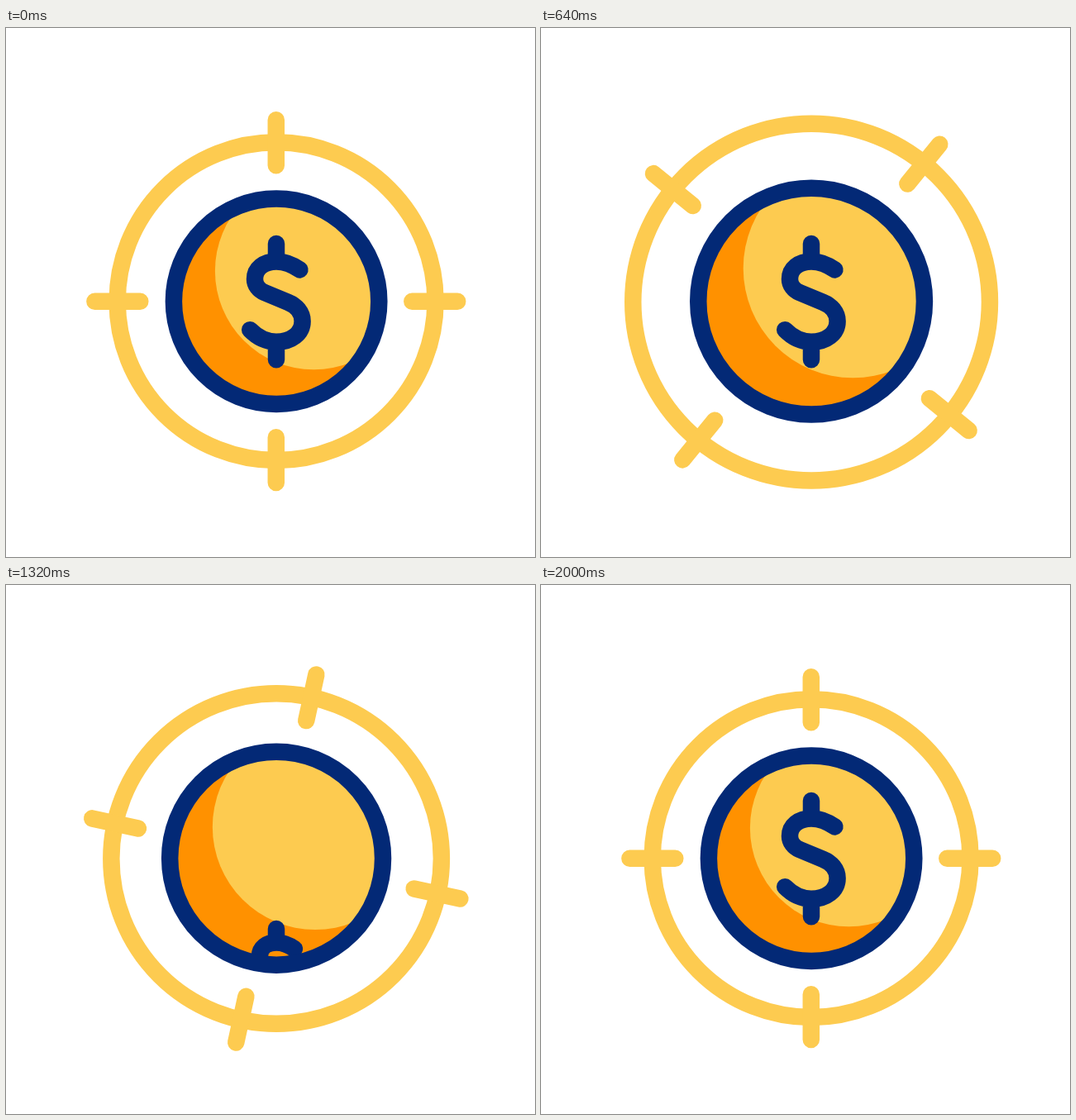
These frames come from a looping animation (640 by 640 pixels, 2220 ms). An HTML page with a canvas:

```html
<!DOCTYPE html>
<html lang="en">
<head>
<meta charset="utf-8">
<title>Coin target</title>
<style>
  html, body { margin: 0; width: 100%; height: 100%; overflow: hidden; background: #fff; }
  canvas { display: block; width: 100vw; height: 100vh; }
</style>
</head>
<body>
<canvas width="640" height="640"></canvas>
<script>
const LOOP = 2220, CX = 327.1, CY = 330.7;
const YELLOW = '#fdcb50', ORANGE = '#ff9100', NAVY = '#032976';
const ctx = document.querySelector('canvas').getContext('2d');

const dollar = new Path2D(
  'M0-70V-49M0 49V70.3' +
  'M28.4-38.5C21-43.7 11-48.5 0-48.5C-15-48.5-26-40.2-26-27.2' +
  'C-26-19.7-21-13.7-14-10.7L14 .8C24 4.8 31.6 13.3 31.6 23.8' +
  'C31.6 38.8 18 48.8 0 48.8C-13 48.8-24 42.3-31.8 34.3');

// Eased progress from time a to b; x1 and x2 shape the start and the end.
function ease(t, a, b, x1 = 1 / 3, x2 = 2 / 3) {
  const x = Math.min(1, Math.max(0, (t - a) / (b - a)));
  let lo = 0, hi = 1;
  for (let i = 0; i < 24; i++) {
    const s = (lo + hi) / 2, r = 1 - s;
    if (3 * r * r * s * x1 + 3 * r * s * s * x2 + s ** 3 < x) lo = s; else hi = s;
  }
  return lo * lo * (3 - 2 * lo);
}

function circle(x, y, r) {
  const path = new Path2D();
  path.arc(x, y, r, 0, 2 * Math.PI);
  return path;
}

function fill(path, color) {
  ctx.fillStyle = color;
  ctx.fill(path);
}

// Strokes a moved and scaled path while keeping the line weight.
function stroke(path, color, x = 0, y = 0, scale = 1, angle = 0) {
  const placed = new Path2D();
  placed.addPath(path, new DOMMatrix().translate(x, y).rotate(angle).scale(scale));
  ctx.strokeStyle = color;
  ctx.stroke(placed);
}

const ring = circle(0, 0, 192.4);
const ticks = new Path2D('M0-219.4V-164.5M0 164.5V219.4M-219.4 0H-164.5M164.5 0H219.4');

function draw(t) {
  ctx.fillStyle = '#fff';
  ctx.fillRect(0, 0, 640, 640);
  ctx.lineWidth = 20.5;
  ctx.lineCap = ctx.lineJoin = 'round';

  const turn = ease(t, 200, 800, 0.375, 0.557) - ease(t, 1000, 1520, 0.241, 0.628);
  const grow = 1 + 0.14 * turn;
  stroke(ring, YELLOW, CX, CY + turn, grow);
  stroke(ticks, YELLOW, CX - 0.3, CY + turn, grow, 45 * turn);

  const swell = ease(t, 200, 785) - ease(t, 1005, 1511);
  const coin = circle(CX, CY, 124.2 * (1 + 0.12 * swell));
  const k = 1 + 0.13 * swell;
  fill(coin, ORANGE);
  ctx.save();
  ctx.clip(coin);
  fill(circle(CX + 45.2 * k, CY + swell - 36.8 * k, 119.4 * k), YELLOW);

  // The sign drops out of the bottom, then comes in from the top.
  const drop = t < 1525 ? ease(t, 1016, 1520) : ease(t, 1510, 2000) - 1;
  stroke(dollar, NAVY, CX - 0.1, CY + 0.2 + 212 * drop, 1 - 0.35 * Math.abs(drop));
  ctx.restore();
  stroke(coin, NAVY);
}

function frame() {
  draw(performance.now() % LOOP);
  requestAnimationFrame(frame);
}
frame();
</script>
</body>
</html>
```
